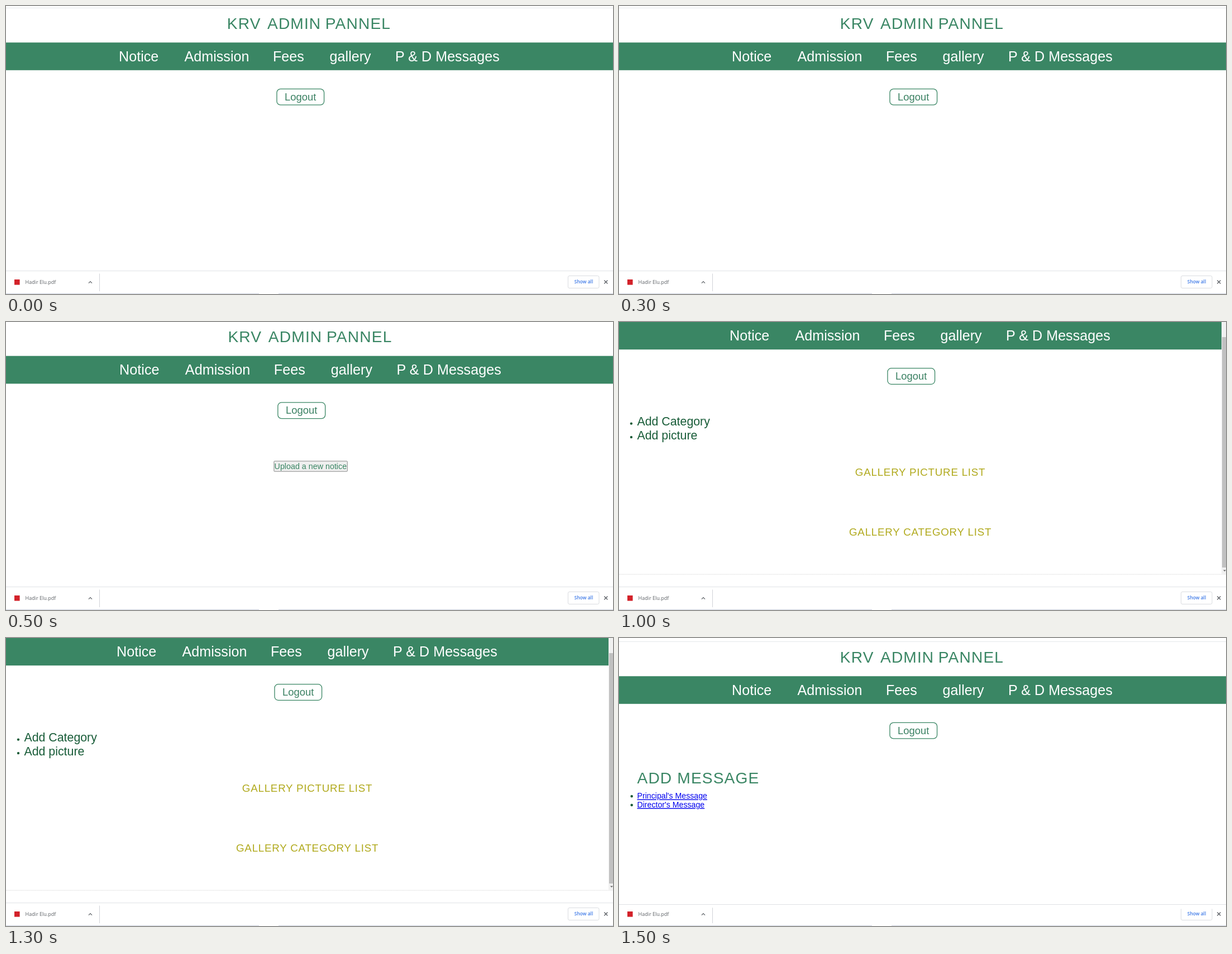
Write an HTML page that moves like this. It is 1087x515 px and loops after 2000 ms.

```html
<!DOCTYPE html>
<html lang="en">
<head>
<meta charset="utf-8">
<title>Admin panel</title>
<style>
  html, body { margin: 0; width: 100%; height: 100%; overflow: hidden; background: #fff; }
  svg { display: block; width: 1087px; height: 515px; }
  text { font-family: "Liberation Sans", Arial, sans-serif; white-space: pre; }
  .ui { font-family: "Open Sans", "Noto Sans", sans-serif; }
  .title { font-size: 28.2px; letter-spacing: 1.1px; fill: #3a8664; }
  .nav { font-size: 25.15px; fill: #fff; }
  .item { font-size: 21.35px; fill: #185c38; }
  .head { font-size: 18.8px; letter-spacing: .75px; fill: #b0a91c; text-anchor: middle; }
  .link { font-size: 14.16px; fill: #00e; text-decoration: underline; }
  .dot { fill: #185c38; }
</style>
</head>
<body>
<svg viewBox="0 0 1087 515">
  <rect width="1087" height="515" fill="#fff"/>

  <g id="header">
    <path d="M-10 3.5H1110" stroke="#e6e8eb"/>
    <g class="title">
      <text x="395.8" y="40.5">KRV</text>
      <text x="468" y="40.5">ADMIN</text>
      <text x="571.8" y="40.5">PANNEL</text>
    </g>
    <rect x="-10" y="65.3" width="1120" height="49.5" fill="#3a8664"/>
    <g class="nav">
      <text x="202.1" y="98.8">Notice</text>
      <text x="319.5" y="98.8">Admission</text>
      <text x="478" y="98.8">Fees</text>
      <text x="579.6" y="98.8">gallery</text>
      <text x="697" y="98.8">P &amp; D Messages</text>
    </g>
    <rect x="485" y="148.3" width="84.6" height="28.6" rx="6.5" fill="#fff" stroke="#3a8664" stroke-width="1.3"/>
    <text x="499" y="168.8" font-size="18.4" fill="#3a8062">Logout</text>
  </g>

  <g id="notice">
    <rect x="479.9" y="248.8" width="131.4" height="18.4" rx="1" fill="#efefef" stroke="#8a8a8a"/>
    <text x="480.6" y="263.2" font-size="14.3" fill="#3a8664">Upload a new notice</text>
  </g>

  <g id="gallery">
    <circle class="dot" cx="22" cy="181.6" r="2.2"/>
    <circle class="dot" cx="22" cy="205.9" r="2.2"/>
    <text class="item" x="32.4" y="185.3">Add Category</text>
    <text class="item" x="32.4" y="209.6">Add picture</text>
    <text class="head" x="539.6" y="274.6">GALLERY PICTURE LIST</text>
    <text class="head" x="539.6" y="381.7">GALLERY CATEGORY LIST</text>
    <path d="M0 451.2H1087" stroke="#d4d4d4" stroke-dasharray="1.2 1"/>
    <rect x="1079" width="8" height="450.5" fill="#f1f1f1"/>
    <rect x="1080" y="27" width="7" height="412" fill="#c1c1c1"/>
    <path d="M1082 443.5h5l-2.5 2.6z" fill="#606060"/>
  </g>

  <g id="message">
    <g class="title">
      <text x="32.5" y="259.8">ADD</text>
      <text x="104.3" y="259.8">MESSAGE</text>
    </g>
    <circle class="dot" cx="22.8" cy="283" r="2.3"/>
    <circle class="dot" cx="22.8" cy="298.7" r="2.3"/>
    <text class="link" x="32.5" y="287.3">Principal's Message</text>
    <text class="link" x="32.5" y="303">Director's Message</text>
  </g>

  <g id="downloads" fill="none">
    <rect x="15" y="489" width="9.6" height="9.6" fill="#d3222a"/>
    <text class="ui" x="34.5" y="497" font-size="9" fill="#5f6368">Hadir Elu.pdf</text>
    <path d="M148 495.6l3-3 3 3" stroke="#5f6368" stroke-width="1.3"/>
    <path d="M167.5 478.5V510" stroke="#d0d3d7"/>
    <rect x="1006.5" y="482.5" width="55.5" height="22" rx="2.5" stroke="#dadce0"/>
    <text class="ui" x="1017.8" y="496.3" font-size="8.4" font-weight="600" fill="#3b78e7">Show all</text>
    <path d="M1071.3 490.5l6 6m0-6l-6 6" stroke="#5f6368" stroke-width="1.4"/>
    <path d="M0 514.4H453M488 514.4H1087" stroke="#cdd2e0"/>
    <rect id="cover" y="474" width="1087" height="8.3" fill="#fff"/>
    <rect id="cover2" x="1004" y="482" width="62" height="2.4" fill="#fff"/>
    <path id="edge" d="M0 473.7H1087" stroke="#dfe1e5"/>
  </g>
</svg>
<script>
  const LOOP = 2000, STEP = 500;
  const $ = id => document.getElementById(id);
  const show = (id, on) => $(id).setAttribute('display', on ? 'inline' : 'none');
  const views = [
    { header: 'translate(0 0)' },
    { header: 'matrix(1.003 0 0 1.003 .4 -4.8)', panel: 'notice' },
    { header: 'translate(-4 -65.6)', panel: 'gallery' },
    { header: 'translate(0 3)', panel: 'message', drop: 2.8 }
  ];

  function draw(t) {
    const view = views[Math.floor((t % LOOP) / STEP)];
    const drop = view.drop || 0;
    $('header').setAttribute('transform', view.header);
    for (const id of ['notice', 'gallery', 'message']) show(id, id === view.panel);
    show('cover', drop);
    show('cover2', drop);
    $('edge').setAttribute('transform', `translate(0 ${drop})`);
  }

  const start = performance.now();
  function tick() {
    draw(performance.now() - start);
    requestAnimationFrame(tick);
  }
  tick();
</script>
</body>
</html>
```
